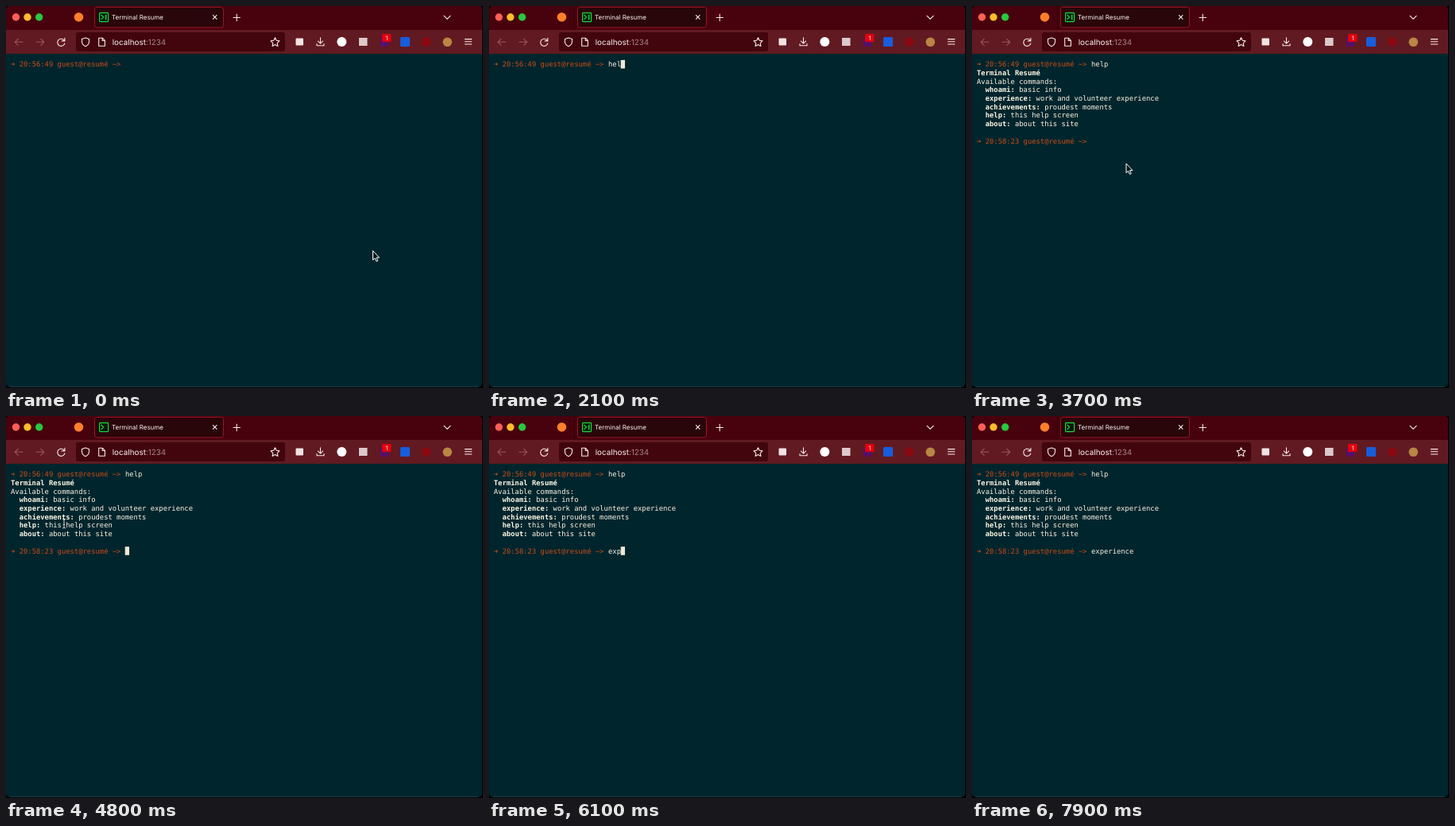
An HTML page that plays this animation: 600x480 px, repeating every 8 s.

```html
<!DOCTYPE html>
<html lang="en">
<head>
<meta charset="utf-8">
<title>Terminal Resume</title>
<style>
  html, body { margin: 0; width: 100%; height: 100%; overflow: hidden; background: #000; }
  svg { display: block; width: 600px; height: 480px; }
  text { white-space: pre; text-rendering: geometricPrecision; }
  .ui { font-family: Inter, "Liberation Sans", sans-serif; fill: #fbf3f4; }
  .term { font: 8.86px "DejaVu Sans Mono", "Liberation Mono", monospace; fill: #fdf6e3; }
  .prompt { fill: #cb4b16; }
  .icon { fill: none; stroke: #f6e9ea; stroke-width: 1.1; stroke-linecap: round; stroke-linejoin: round; }
  .dim { stroke: #985760; }
</style>
</head>
<body>
<svg viewBox="0 0 600 480">
  <rect width="599" height="479" rx="5" fill="#00252d"/>
  <path d="M5 478.5H594" stroke="#2b4850" stroke-width=".8"/>

  <!-- tab bar -->
  <path d="M0 30V5Q0 0 5 0H594Q599 0 599 5V30Z" fill="#47020d"/>
  <circle cx="12.5" cy="14" r="4.7" fill="#ff5f57"/>
  <circle cx="27" cy="14" r="4.7" fill="#febc2e"/>
  <circle cx="41.7" cy="14" r="4.7" fill="#28c840"/>
  <circle cx="91.5" cy="14" r="5.8" fill="#ff7f2b"/>
  <path d="M107.5 0V30" stroke="#2d0308"/>
  <rect x="111.5" y="1.5" width="162" height="25.5" rx="3" fill="#29060a" stroke="#981626"/>
  <g fill="none" stroke="#19d83c" stroke-width="1.2">
    <rect x="117.6" y="8.6" width="11" height="11" rx=".8" fill="#041708"/>
    <path d="M119.6 11L122.6 14.1L119.6 17.2"/>
    <path id="bar" d="M125.7 10.8V17.4" stroke-width="1.6"/>
  </g>
  <text class="ui" x="133" y="17.2" font-size="8">Terminal Resume</text>
  <path class="icon" stroke-width="1" d="M260.4 11.7L265 16.3M265 11.7L260.4 16.3M286 14.5H294.4M290.2 10.3V18.7M551 12.3L555 16.3L559 12.3"/>

  <!-- navigation bar -->
  <rect y="30" width="599" height="30" fill="#611a21"/>
  <g class="icon dim">
    <path d="M21 45.3H11.3M15.2 41.3L11.2 45.3L15.2 49.3"/>
    <path d="M38 45.3H47.7M43.8 41.3L47.8 45.3L43.8 49.3"/>
  </g>
  <path class="icon" d="M73.3 43.4A4.6 4.6 0 1 0 73.8 47M73.9 40.3V43.9H70.3"/>
  <rect x="88" y="33" width="263" height="24" rx="3" fill="#42050d"/>
  <g class="icon">
    <path d="M100 40L104.5 41.6V44.8Q104.4 48.8 100 50.8Q95.6 48.8 95.5 44.8V41.6Z"/>
    <path d="M116.7 40.3H121.4L124.4 43.3V50.3H116.7ZM121.2 40.5V43.5H124.2"/>
    <path d="M338.5 39.8L340.2 43.3L344 43.9L341.2 46.6L341.9 50.4L338.5 48.6L335.1 50.4L335.8 46.6L333 43.9L336.8 43.3Z"/>
    <path d="M395.5 39.8V47M392.4 44.1L395.5 47.2L398.6 44.1M391 47.5V49.8H400V47.5"/>
    <path d="M577.3 41.6H585.7M577.3 44.8H585.7M577.3 48H585.7"/>
  </g>
  <text class="ui" x="133.7" y="48.8" font-size="9.9">localhost<tspan fill="#a78388">:1234</tspan></text>
  <rect x="364.5" y="40.5" width="9.5" height="9" rx="1" fill="#f1e3e4"/>
  <circle cx="422.3" cy="45" r="6" fill="#fff"/>
  <rect x="444" y="40" width="10.5" height="10" fill="#dcc9cb"/>
  <rect x="471" y="40" width="10" height="11" fill="#55106c"/>
  <rect x="473" y="35" width="11.5" height="10" rx="1" fill="#e1000d"/>
  <text class="ui" x="477.2" y="42.8" font-size="7.5">1</text>
  <rect x="496" y="39" width="12" height="12" rx="1.5" fill="#175ddc"/>
  <circle cx="528.7" cy="45" r="5.8" fill="#8b0711"/>
  <circle cx="555.2" cy="45.3" r="5.8" fill="#b98645"/>

  <!-- terminal -->
  <g id="first" class="term"></g>
  <g id="reply" class="term"></g>
  <rect id="caret" width="5.3" height="10.6" fill="#eee8d5"/>
  <g id="mouse">
    <path id="arrow" d="M0 0V11.6L2.6 9.3L4.4 13.4L6.2 12.6L4.5 8.6H8Z" fill="#06161a" stroke="#fff"/>
    <path id="beam" d="M-2 -5.5Q0 -5.5 0 -4V4.5Q0 6 -2 6M2 -5.5Q0 -5.5 0 -4M0 4.5Q0 6 2 6M-1.2 1.5H1.2" fill="none" stroke="#d5d8d2"/>
  </g>
</svg>
<script>
const $ = id => document.getElementById(id);
const LOOP = 8000, CHAR = 5.334, LEFT = 6, LINE = 10.7;
const baseline = row => 76.2 + row * LINE;
const column = n => LEFT + n * CHAR;

function addText(group, col, row, html, cls = "") {
  group.insertAdjacentHTML("beforeend",
    `<text class="${cls}" x="${column(col)}" y="${baseline(row)}">${html}</text>`);
  return group.lastElementChild;
}

function addPrompt(group, row, time) {
  addText(group, 0, row, "➜", "prompt");
  addText(group, 2, row, time + " guest@resumé ~&gt;", "prompt");
  return addText(group, 27, row, "");
}

const bold = s => `<tspan font-weight="bold">${s}</tspan>`;
const inputs = [addPrompt($("first"), 0, "20:56:49"), addPrompt($("reply"), 9, "20:58:23")];
addText($("reply"), 0, 1, bold("Terminal Resumé"));
addText($("reply"), 0, 2, "Available commands:");
[["whoami", "basic info"],
 ["experience", "work and volunteer experience"],
 ["achievements", "proudest moments"],
 ["help", "this help screen"],
 ["about", "about this site"]
].forEach(([name, info], i) => addText($("reply"), 2, 3 + i, bold(name + ":") + " " + info));

// Pointer path: time, x, y
const path = [
  [2900, 330, 330], [3300, 255, 245], [3700, 194, 198], [3950, 150, 264],
  [4350, 80, 105], [4800, 73, 135], [5100, 76, 148], [5400, 100, 221], [5800, 100, 221]
];

function pointerAt(t) {
  if (t < 200) return [461.5, 307.5];
  const i = path.findIndex(p => t < p[0]);
  if (i < 1) return null;
  const [a, b] = [path[i - 1], path[i]];
  const k = (t - a[0]) / (b[0] - a[0]), e = k * k * (3 - 2 * k);
  return [a[1] + (b[1] - a[1]) * e, a[2] + (b[2] - a[2]) * e];
}

const show = (el, on) => el.style.display = on ? "" : "none";
const typed = (word, t, start, step) =>
  word.slice(0, Math.max(0, Math.floor((t - start) / step) + 1));

function draw(t) {
  const replied = t >= 2400;
  const words = [typed("help", t, 1900, 100), typed("experience", t, 5830, 130)];
  inputs.forEach((el, i) => el.textContent = words[i]);
  show($("reply"), replied);

  const row = replied ? 9 : 0;
  const phase = replied ? t - 2800 : t - 100;
  show($("caret"), phase >= 0 && phase % 1000 < 500 && t < 7850);
  $("caret").setAttribute("x", column(27 + words[+replied].length) - .3);
  $("caret").setAttribute("y", baseline(row) - 8.3);

  show($("bar"), (t + 800) % 2200 < 1100);

  const p = pointerAt(t);
  show($("mouse"), p);
  if (p) {
    const overText = replied && p[0] < 240 && p[1] > 79 && p[1] < 175;
    show($("arrow"), !overText);
    show($("beam"), overText);
    $("mouse").setAttribute("transform", `translate(${p})`);
  }
}

const begin = performance.now();
function tick() {
  draw((performance.now() - begin) % LOOP);
  requestAnimationFrame(tick);
}
tick();
</script>
</body>
</html>
```
